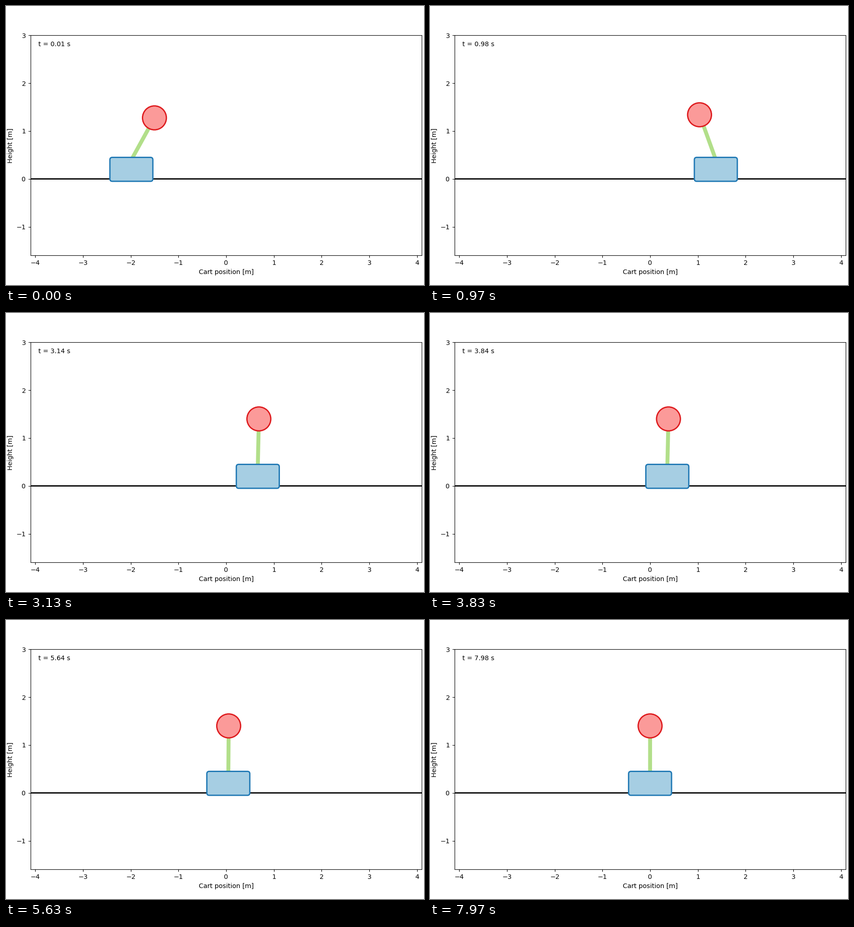
Write a matplotlib script that moves like this. It is 917x611 px and loops after 8.01 s.

```python
import numpy as np
import matplotlib.pyplot as plt
from matplotlib.animation import FuncAnimation
from matplotlib.patches import Circle, FancyBboxPatch

W, H, DPI = 917, 611, 64
LOOP_MS, TICK_MS = 8010, 30
FPS, STEPS = 30, 240    # the motion advances in 240 steps at 30 per second
PX = 72 / DPI           # one pixel in points
U = 1.43 * PX           # style unit: 1.43 pixels

CART_W, CART_H, CART_Y = 0.9, 0.5, -0.05
ROUND = 0.05
PIVOT_Y, LENGTH, BALL_R = 0.4, 1.0, 0.25

plt.rcParams.update({
    "font.family": "DejaVu Sans",
    "font.size": 10 * U,
    "axes.linewidth": 0.8 * U,
    "axes.labelpad": 4 * U,
    "xtick.major.size": 3.5 * U,
    "ytick.major.size": 3.5 * U,
    "xtick.major.width": 0.8 * U,
    "ytick.major.width": 0.8 * U,
    "xtick.major.pad": 3.5 * U,
    "ytick.major.pad": 3.5 * U,
})


def mode(t, decay, freq, a, b):
    """Damped oscillation starting at a."""
    return np.exp(-decay * t) * (a * np.cos(freq * t) + b * np.sin(freq * t))


def state(t):
    """Cart position and pole angle under balancing feedback."""
    env = 13.8 * np.exp(-0.95 * t)
    phase = 0.45 * (t - 3.86)
    c, s = np.cos(phase), np.sin(phase)
    x = env * c + mode(t, 3.5, 1.9, 0.283, -3.158)
    theta = env * (0.0675 * c + 0.1002 * s) + mode(t, 3.5, 1.9, 2.018, 3.08)
    return x, theta


fig = plt.figure(figsize=(W / DPI, H / DPI), dpi=DPI, facecolor="white")
left, top, width, height = 53.6, 64.2, 858.8, 482.2
ax = fig.add_axes([left / W, 1 - (top + height) / H, width / W, height / H])
ax.set_xlim(-4.1, 4.1)
ax.set_ylim(-1.6, 3)
ax.set_xticks(range(-4, 5))
ax.set_yticks(range(-1, 4))
ax.set_xlabel("Cart position [m]")
ax.set_ylabel("Height [m]")

ax.axhline(0, color="black", lw=2 * U, zorder=1, snap=False)
pole, = ax.plot([], [], color="#b2df8a", lw=6 * U, zorder=2)
cart = FancyBboxPatch(
    (0, CART_Y + ROUND), CART_W - 2 * ROUND, CART_H - 2 * ROUND,
    boxstyle=f"round,pad={ROUND},rounding_size={ROUND}",
    fc="#a6cee3", ec="#1f78b4", lw=2 * U, zorder=3)
ball = Circle((0, 0), BALL_R, fc="#fb9a99", ec="#de1b1e", lw=2 * U, zorder=4)
ax.add_patch(cart)
ax.add_patch(ball)
clock = ax.text(0.02, 0.95, "", transform=ax.transAxes)


def draw(i):
    # latest step that begins during this tick
    step = min((9 * i + 7) // 10, STEPS - 1)
    t = (round(step * 100 / FPS) + 1) / 100
    x, theta = state(t)
    tip = x + LENGTH * np.sin(theta), PIVOT_Y + LENGTH * np.cos(theta)
    cart.set_x(x - CART_W / 2 + ROUND)
    pole.set_data([x, tip[0]], [PIVOT_Y, tip[1]])
    ball.center = tip
    clock.set_text(f"t = {t:.2f} s")
    return pole, cart, ball, clock


anim = FuncAnimation(fig, draw, frames=LOOP_MS // TICK_MS, interval=TICK_MS,
                     repeat=True, repeat_delay=0, blit=False)
plt.show()
```
